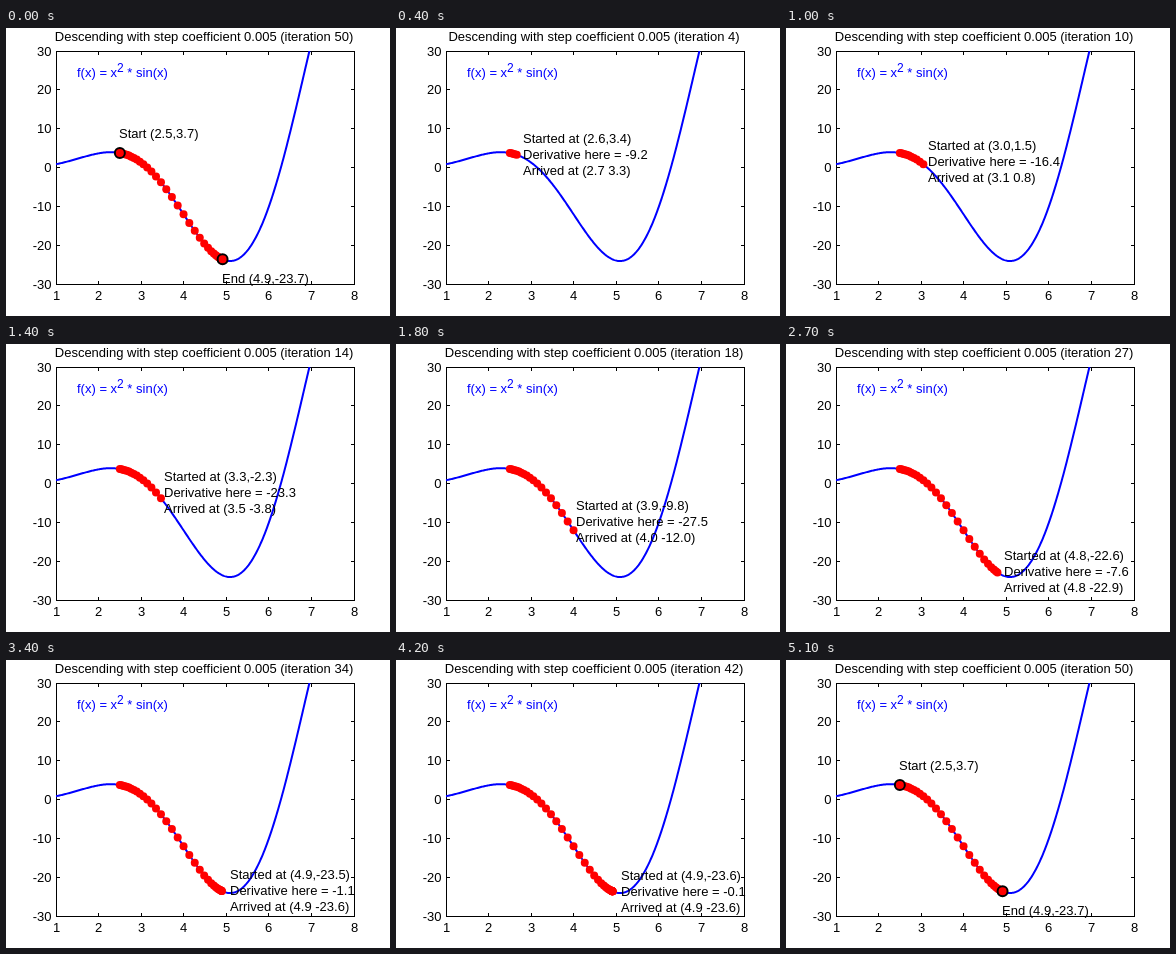
An HTML page with a canvas for the animation above (6.1 s loop, 384 px wide and 288 px high).

```html
<!DOCTYPE html>
<html lang="en">
<head>
<meta charset="utf-8">
<title>Gradient descent</title>
<style>
  html, body { margin: 0; width: 100%; height: 100%; overflow: hidden; background: #fff; }
  canvas { display: block; }
</style>
</head>
<body>
<canvas id="stage" width="384" height="288"></canvas>
<script>
const ctx = document.getElementById('stage').getContext('2d');
const LEFT = 50, TOP = 23, WIDTH = 298, HEIGHT = 233;
const STEP = 0.005, ITERATIONS = 50, STEP_MS = 100, LOOP_MS = 6100;
const BLUE = '#00f', RED = '#f00', BLACK = '#000';

const f = x => x * x * Math.sin(x);
// Doubled cosine term: the descent settles at x = 4.9, just short of the minimum.
const slope = x => 2 * x * x * Math.cos(x) + 2 * x * Math.sin(x);
const px = x => LEFT + (x - 1) * WIDTH / 7;
const py = y => TOP + (30 - y) * HEIGHT / 60;
const num = v => v.toFixed(1);

const path = [2.5];
for (let i = 0; i < ITERATIONS; i++) path.push(path[i] - STEP * slope(path[i]));

function text(str, x, y, align = 'left', color = BLACK, size = 13) {
  ctx.font = `${size}px "Liberation Sans", Arial, sans-serif`;
  ctx.fontKerning = 'none';
  ctx.textAlign = align;
  ctx.fillStyle = color;
  ctx.fillText(str, x, y);
  return x + ctx.measureText(str).width;
}

function line(x1, y1, x2, y2) {
  ctx.beginPath();
  ctx.moveTo(x1, y1);
  ctx.lineTo(x2, y2);
  ctx.stroke();
}

function dot(x, radius, outlined) {
  ctx.beginPath();
  ctx.arc(px(x), py(f(x)), radius, 0, 2 * Math.PI);
  ctx.fillStyle = RED;
  ctx.fill();
  if (!outlined) return;
  ctx.strokeStyle = BLACK;
  ctx.lineWidth = 2;
  ctx.stroke();
}

function drawAxes() {
  const right = LEFT + WIDTH, bottom = TOP + HEIGHT;
  ctx.strokeStyle = BLACK;
  ctx.lineWidth = 1;
  ctx.strokeRect(LEFT + 0.5, TOP + 0.5, WIDTH, HEIGHT);
  for (let v = 1; v <= 8; v++) {
    const x = Math.floor(px(v)) + 0.5;
    line(x, TOP, x, TOP + 4);
    line(x, bottom, x, bottom - 3);
    text(v, x, 272, 'center');
  }
  for (let v = -30; v <= 30; v += 10) {
    const y = Math.floor(py(v)) + 0.5;
    line(LEFT, y, LEFT + 4, y);
    line(right, y, right - 3, y);
    text(v, 45.5, y + 4.5, 'right');
  }
}

function drawCurve() {
  ctx.save();
  ctx.beginPath();
  ctx.rect(LEFT, TOP, WIDTH + 1, HEIGHT + 1);
  ctx.clip();
  ctx.beginPath();
  for (let x = 1; x <= 7.1; x += 0.02) ctx.lineTo(px(x), py(f(x)));
  ctx.strokeStyle = BLUE;
  ctx.lineWidth = 2;
  ctx.stroke();
  ctx.restore();

  let x = text('f(x) = x', 71, 49, 'left', BLUE);
  x = text('2', x, 44, 'left', BLUE, 12);
  text(' * sin(x)', x, 49, 'left', BLUE);
}

function drawStepLabel(from, to) {
  const x = Math.floor(px(from + 0.2)), y = Math.round(py(f(from)) + 4.5);
  text(`Started at (${num(from)},${num(f(from))})`, x, y - 16);
  text(`Derivative here = ${num(slope(from))}`, x, y);
  text(`Arrived at (${num(to)} ${num(f(to))})`, x, y + 16);
}

function drawEndPoint(name, x, shift) {
  dot(x, 5, true);
  text(`${name} (${num(x)},${num(f(x))})`, Math.floor(px(x)), Math.round(py(f(x) + shift) + 4.5));
}

function draw(time) {
  const tick = Math.floor(time % LOOP_MS / STEP_MS);
  const done = tick === 0 || tick > ITERATIONS;
  const count = done ? ITERATIONS : tick;

  ctx.fillStyle = '#fff';
  ctx.fillRect(0, 0, 384, 288);
  drawAxes();
  drawCurve();
  text(`Descending with step coefficient 0.005 (iteration ${count})`, 198, 13, 'center');
  path.slice(0, count + 1).forEach(x => dot(x, 4));
  if (done) {
    drawEndPoint('Start', path[0], 5);
    drawEndPoint('End', path[ITERATIONS], -5);
  } else {
    drawStepLabel(path[count - 1], path[count]);
  }
}

const start = performance.now();
function frame() {
  draw(performance.now() - start);
  requestAnimationFrame(frame);
}
frame();
</script>
</body>
</html>
```
